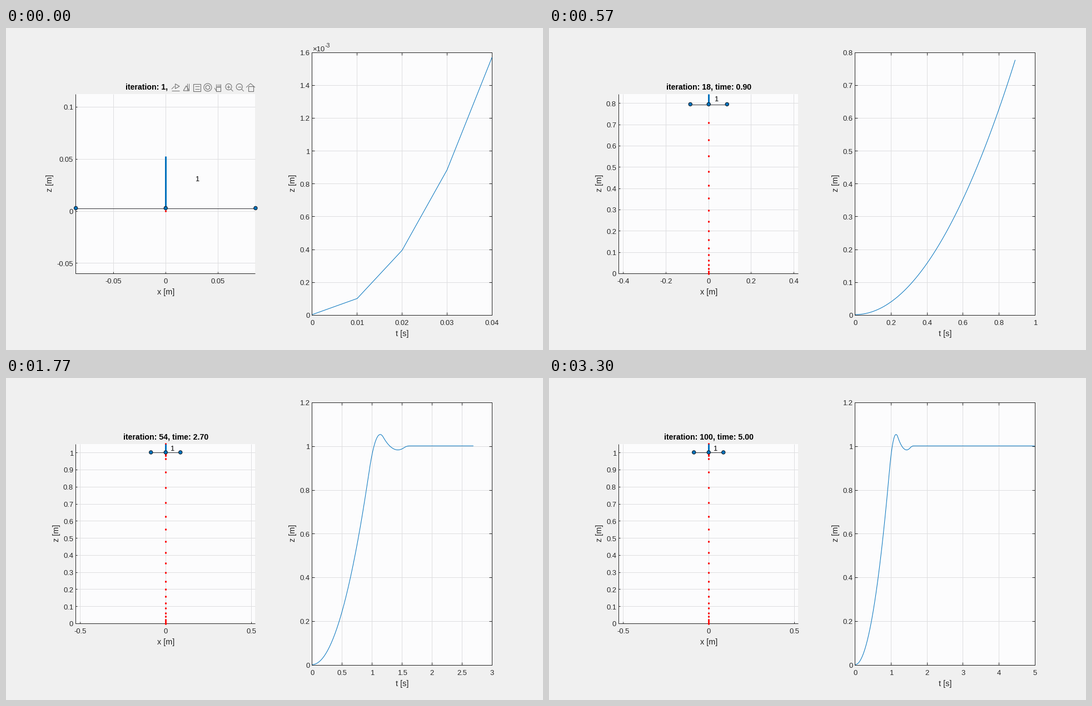
Animation, 966 px wide and 580 px high, one loop 3330 ms. Source, as a matplotlib script:

```python
import math

import numpy as np
import matplotlib.pyplot as plt
from matplotlib.animation import FuncAnimation
from matplotlib.lines import Line2D
from matplotlib.patches import Circle, Polygon, Rectangle

W, H, DPI = 966, 580, 100
PT = 72 / DPI                      # points per pixel
LOOP, SLOT, STATES = 3330, 15, 100
STEP, SAMPLE = 0.05, 0.01          # seconds per iteration, per curve sample
ARM, MAST = 0.0862, 0.05           # vehicle size in metres

BACK, PAPER, GRID, INK = "#f0f0f0", "#fcfcfd", "#dedee0", "#262626"
BLUE, RED, ICON = "#0072bd", "#ff0000", "#707070"
LEFT_BOX = (125.1, 118.7, 448.4, 442)
RIGHT_BOX = (550.4, 44, 873.7, 516.7)
TICK_PX, LABEL_PX, TITLE_PX = 13, 14.4, 14.15

# (end time, acceleration): climb, coast, recover, settle
PHASES = [(0.946, 1.96), (1.184, -9.81), (1.526, 1.96), (1.623, -1.96)]
NICE = [m * 10.0 ** e for e in range(-5, 1) for m in (1, 2, 5)]

plt.rcParams["font.family"] = "Liberation Sans"
fig = plt.figure(figsize=(W / DPI, H / DPI), dpi=DPI, facecolor=BACK)
ax = fig.add_axes([0, 0, 1, 1])
shown = {"state": None}


def height(t):
    t = np.asarray(t, float)
    z = np.ones_like(t)
    start, z0, v0 = 0.0, 0.0, 0.0
    for end, acc in PHASES:
        dt = t - start
        z = np.where((t >= start) & (t < end), z0 + v0 * dt + acc * dt**2 / 2, z)
        span = end - start
        z0 += v0 * span + acc * span**2 / 2
        v0 += acc * span
        start = end
    return z


def auto_limit(top, most):
    """Tightest round limit with at most `most` intervals, then finest step."""
    options = []
    for step in NICE:
        count = math.ceil(top / step - 1e-6)
        if 2 <= count <= most:
            options.append((round(count * step, 9), step))
    return min(options)


def fit_step(span, most):
    return next(s for s in NICE if span / s <= most)


def ticks(lo, hi, step):
    first, last = math.ceil(lo / step - 1e-6), math.floor(hi / step + 1e-6)
    return np.array([round(k * step, 9) for k in range(first, last + 1)])


def line(xs, ys, color=INK, width=1.0):
    ax.add_line(Line2D(xs, ys, color=color, lw=width * PT,
                       solid_capstyle="butt"))


def bars(xs, top, bottom, color=INK, width=1.0):
    ax.vlines(xs, top, bottom, colors=color, linewidths=width * PT)


def rows(ys, left, right, color=INK, width=1.0):
    ax.hlines(ys, left, right, colors=color, linewidths=width * PT)


def text(x, y, s, size=TICK_PX, color=INK, ha="center", va="baseline", **kw):
    ax.text(x, y, s, fontsize=size * PT, color=color, ha=ha, va=va, **kw)


def label_width(s):
    return TICK_PX * sum({".": 0.278, "-": 0.333}.get(c, 0.556) for c in s)


def draw_axes(box, xlim, ylim, xstep, ystep, xname, yname, framed, scale=1):
    """Draws one plot frame and returns its data-to-pixel functions."""
    x0, y0, x1, y1 = box

    def px(x):
        return x0 + (np.asarray(x) - xlim[0]) / (xlim[1] - xlim[0]) * (x1 - x0)

    def py(y):
        return y1 - (np.asarray(y) - ylim[0]) / (ylim[1] - ylim[0]) * (y1 - y0)

    xt, yt = ticks(*xlim, xstep), ticks(*ylim, ystep)
    tick = 0.01 * max(x1 - x0, y1 - y0)
    ax.add_patch(Rectangle((x0, y0), x1 - x0, y1 - y0, fc=PAPER, ec="none"))
    bars(px(xt), y0, y1, GRID)
    rows(py(yt), x0, x1, GRID)
    bars(px(xt), y1 - tick, y1)
    rows(py(yt), x0, x0 + tick)
    line([x0, x0, x1], [y0, y1, y1])
    if framed:
        bars(px(xt), y0, y0 + tick)
        rows(py(yt), x1 - tick, x1)
        line([x0, x1, x1], [y0, y0, y1])

    names = [f"{v:g}" for v in np.round(yt * scale, 6)]
    for v in xt:
        text(px(v) + 0.5, y1 + 18.5, f"{v:g}")
    for v, name in zip(yt, names):
        text(x0 - 4, py(v) + 5.3, name, ha="right")
    text((x0 + x1) / 2 + 0.7, y1 + 37.8, xname, LABEL_PX)
    widest = max(map(label_width, names))
    text(x0 - 16.5 - widest, (y0 + y1) / 2 - 0.5, yname, LABEL_PX,
         va="center", rotation=90)
    return px, py


def draw_vehicle(n):
    z = float(height(n * STEP))
    trail = height(np.arange(n) * STEP)
    top = max(z + MAST, trail.max())
    span = max(top, 2 * ARM)
    low = (top - span) / 2
    widened = span > top
    xstep = 0.05 if widened else fit_step(span, 5)
    ystep = 0.05 if widened else fit_step(span, 10.6)
    px, py = draw_axes(LEFT_BOX, (-span / 2, span / 2), (low, low + span),
                       xstep, ystep, "x [m]", "z [m]", False)

    marks = py(trail)
    bars(np.full(n, px(0)), marks - 1.5, marks + 1.5, RED, 3)
    bars([px(0)], py(z + MAST), py(z), BLUE, 3)
    rows([py(z)], px(-ARM), px(ARM), "#333338")
    for x in (-ARM, 0, ARM):
        ax.add_patch(Circle((px(x) + 0.5, py(z) - 0.5), 3.2, fc=BLUE,
                            ec="#101820", lw=PT))
    text(px(ARM / 3) - 0.3, py(z + ARM / 3) + 5.2, "1", color="black", ha="left")
    text(287.8, 110.7, f"iteration: {n}, time: {n * STEP:.2f}", TITLE_PX,
         "black", weight="bold")


def draw_curve(n):
    t = np.arange(5 * n) * SAMPLE
    z = height(t)
    xmax, xstep = auto_limit(t[-1], 7)
    ymax, ystep = auto_limit(z.max(), 10)
    small = ymax < 0.01
    px, py = draw_axes(RIGHT_BOX, (0, xmax), (0, ymax), xstep, ystep,
                       "t [s]", "z [m]", True, 1000 if small else 1)
    if small:
        text(551, 41.5, "×10", ha="left")
        text(574, 35, "-3", 10.5, ha="left")
    line(px(t) + 0.5, py(z) - 0.5, BLUE)


def draw_toolbar():
    y = 107
    ax.add_patch(Rectangle((295, 97), 155, 20.5, fc=BACK, ec="none"))

    def ring(cx, cy, r, sides=40, turn=0.0):
        a = np.arange(sides) * 2 * np.pi / sides - np.pi / 2 + turn
        ax.add_patch(Polygon(np.c_[cx + r * np.cos(a), cy + r * np.sin(a)],
                             fill=False, ec=ICON, lw=1.1 * PT))

    def square(cx, cy, r):
        ring(cx, cy, r * math.sqrt(2), 4, np.pi / 4)

    share, brush, tip, spin, hand, plus, minus, home = np.linspace(305, 440, 8)
    ring(share + 2, y - 2, 5, 3, np.pi / 2)
    line([share - 7, share - 2], [y + 3, y - 2], ICON)
    rows([y + 6], share - 7, share + 7, ICON)
    ring(brush, y + 3, 6, 3)
    bars([brush + 2, brush + 5], y - 7, y + 6, ICON)
    square(tip, y, 6.5)
    rows([y - 2, y + 3], tip - 4, tip + 4, ICON)
    ring(spin, y, 7)
    ring(spin, y, 4, 6)
    square(hand, y + 3, 4)
    bars(hand + np.arange(-4, 5, 2.7), y - 6, y, ICON)
    line([hand - 7, hand - 4], [y + 1, y + 6], ICON)
    for cx in (plus, minus):
        ring(cx - 1, y - 1, 5.5)
        line([cx + 3, cx + 7], [y + 3, y + 7], ICON)
        rows([y - 1], cx - 4, cx + 2, ICON)
    bars([plus - 1], y - 4, y + 2, ICON)
    line([home - 8, home, home + 8], [y, y - 7, y], ICON)
    square(home, y + 2.5, 4.5)


def draw(slot):
    state = min(STATES - 1, int((slot + 1) * SLOT * STATES / LOOP))
    if state == shown["state"]:
        return []
    shown["state"] = state
    ax.clear()
    ax.set_xlim(0, W)
    ax.set_ylim(H, 0)
    ax.axis("off")
    draw_vehicle(state + 1)
    draw_curve(state + 1)
    if state == 0:
        draw_toolbar()
    # paint in the order of creation
    for order, artist in enumerate(ax.get_children()):
        artist.set_zorder(order)
    return []


anim = FuncAnimation(fig, draw, frames=LOOP // SLOT, interval=SLOT,
                     init_func=lambda: draw(0), repeat=True, repeat_delay=0,
                     blit=False)
plt.show()
```
